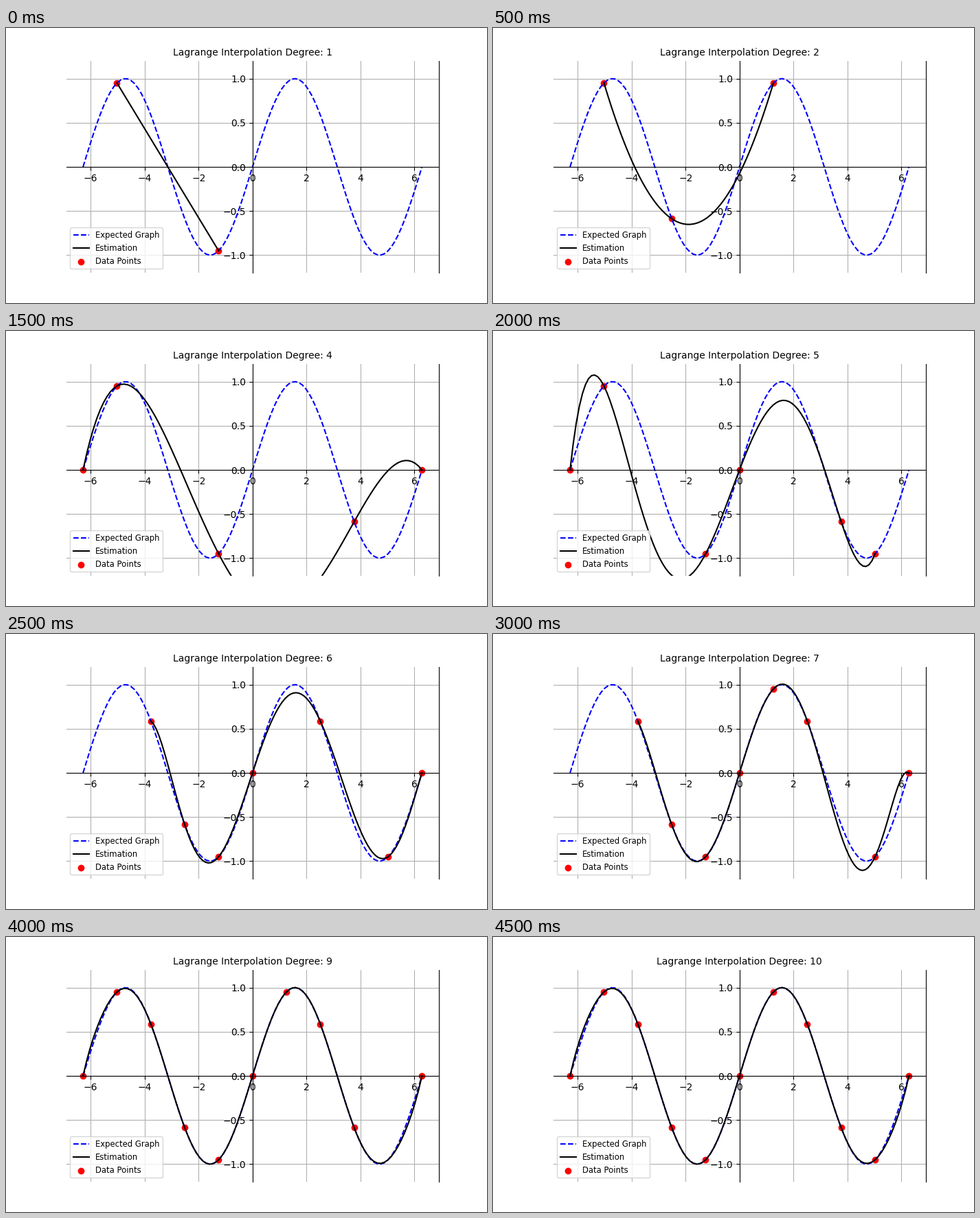
Recreate the animation shown at these times as a matplotlib script. Size 700 by 400 pixels, loop 5 s.

```python
import numpy as np
import matplotlib.pyplot as plt
from matplotlib.animation import FuncAnimation

END = 2 * np.pi
NODES = np.linspace(-END, END, 11)

# low degrees list the nodes they use, high degrees the nodes they skip
KEPT = [{1, 4}, {1, 3, 6}, {0, 3, 4, 6}, {0, 1, 4, 8, 10}]
SKIPPED = [{2, 3, 6, 7, 10}, {0, 1, 6, 8}, {0, 1, 8}, {3, 5}, {9}, set()]


def pick_nodes(step):
    if step < len(KEPT):
        return NODES[sorted(KEPT[step])]
    return np.delete(NODES, sorted(SKIPPED[step - len(KEPT)]))


def lagrange(xs, ys, x):
    total = np.zeros_like(x)
    for i, xi in enumerate(xs):
        others = np.delete(xs, i)
        basis = np.prod([(x - xj) / (xi - xj) for xj in others], axis=0)
        total += ys[i] * basis
    return total


fig, ax = plt.subplots(figsize=(7, 4), dpi=100)

x_all = np.linspace(-END, END, 100)
ax.plot(x_all, np.sin(x_all), "b--", label="Expected Graph")
curve, = ax.plot([], [], "k-", label="Estimation")
dots = ax.scatter([0], [0], color="red", label="Data Points")

ax.set_xlim(-1.1 * END, 1.1 * END)
ax.set_ylim(-1.2, 1.2)
ax.grid(True)
ax.spines["left"].set_position("zero")
ax.spines["bottom"].set_position("zero")
ax.spines["top"].set_visible(False)
ax.legend(loc="lower left", fontsize="small")
title = ax.set_title("", fontsize=10)


def update(step):
    xs = pick_nodes(step)
    ys = np.sin(xs)
    x = np.linspace(xs[0], xs[-1], 100)
    curve.set_data(x, lagrange(xs, ys, x))
    dots.set_offsets(np.column_stack([xs, ys]))
    title.set_text(f"Lagrange Interpolation Degree: {len(xs) - 1}")
    return curve, dots, title


anim = FuncAnimation(fig, update, frames=len(KEPT) + len(SKIPPED),
                     interval=500, repeat=True, repeat_delay=0, blit=False)
plt.show()
```
